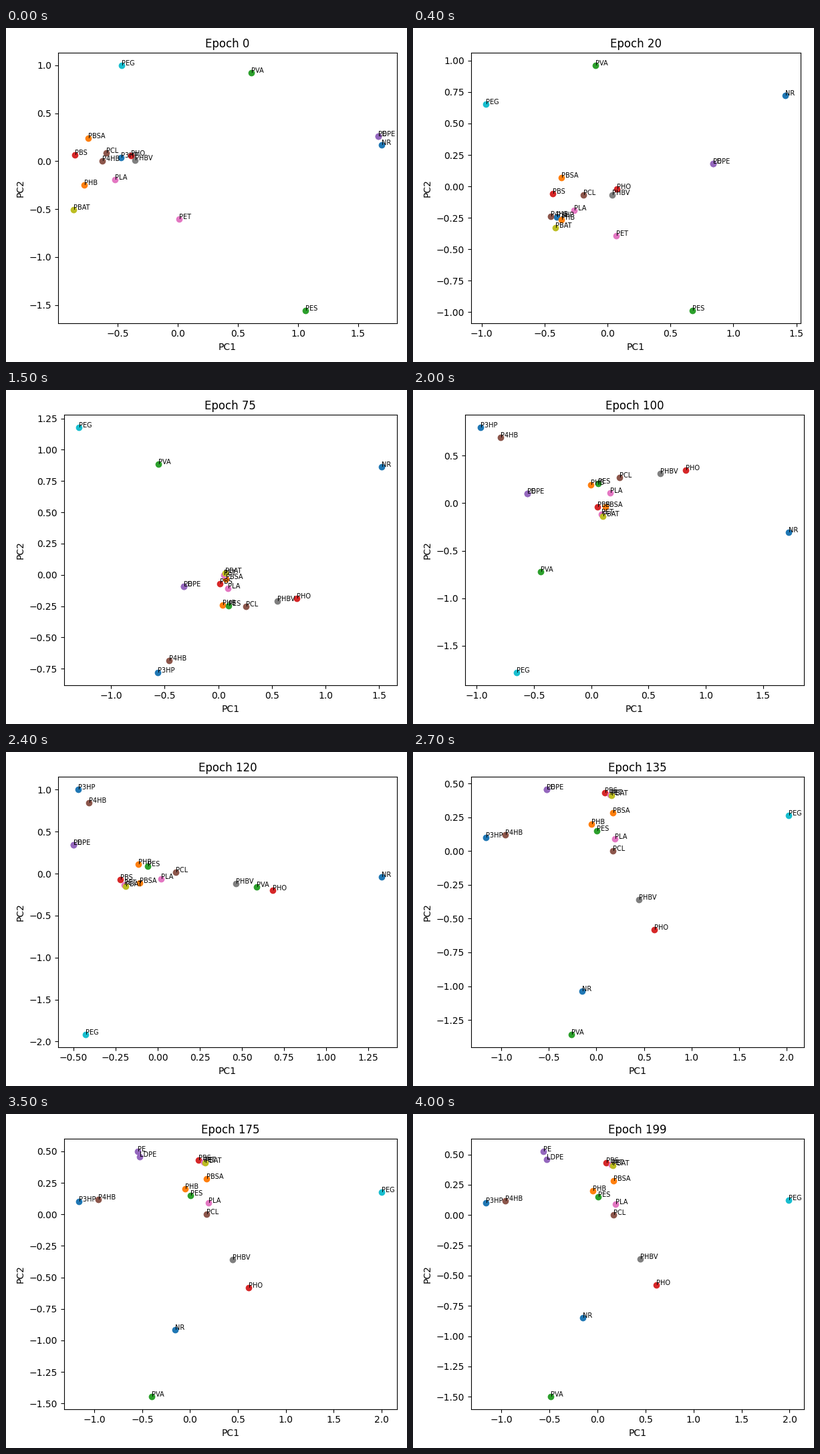
These frames come from a looping animation (600x500 px, 4.1 s). A matplotlib script:

```python
import matplotlib.pyplot as plt
import numpy as np
from matplotlib.animation import FuncAnimation

FRAMES, INTERVAL = 41, 100
LAST_EPOCH = 199

NAMES = ("NR PBSA PVA PBS PE PCL PET PHBV PBAT PEG "
         "P3HP PHB PES PHO LDPE P4HB PLA").split()

# Points are complex numbers: PC1 + PC2 * 1j.
KEYS = [0, 45, 100, 135]
LEADERS = {
    "NR": [1.695 + .17j, 1.06 + 1.409j, 1.722 - .303j, -.154 - 1.036j],
    "PVA": [.61 + .92j, -.977 + 1.018j, -.442 - .718j, -.266 - 1.36j],
    "PBS": [-.86 + .065j, .1 - .206j, .054 - .042j, .09 + .432j],
    "PE": [1.67 + .26j, -.204 + .084j, -.559 + .099j, -.526 + .457j],
    "PCL": [-.598 + .083j, .322 - .255j, .246 + .268j, .17],
    "PBAT": [-.87 - .506j, .152 - .105j, .1 - .134j, .157 + .41j],
    "PEG": [-.47 + 1j, -1.587 + .22j, -.652 - 1.785j, 2.022 + .261j],
    "P3HP": [-.477 + .035j, -.31 - .597j, -.967 + .8j, -1.16 + .1j],
    "PHB": [-.78 - .248j, .152 - .283j, -.005 + .19j, -.05 + .2j],
    "PHO": [-.393 + .06j, .661 - .121j, .824 + .345j, .61 - .58j],
    "PLA": [-.524 - .192j, .055 - .195j, .165 + .106j, .19 + .09j],
}
# Related polymers start alone, then sit between two leaders.
FOLLOWERS = {
    "PBSA": (-.747 + .24j, "PBAT", "PLA", .6),
    "PET": (.01 - .607j, "PBAT", "PBS", .8),
    "PHBV": (-.357 + .01j, "PHO", "PCL", .62),
    "PES": (1.06 - 1.56j, "PHB", "PCL", .75),
    "P4HB": (-.63, "P3HP", "PHB", .82),
    "LDPE": (1.67 + .26j, "PE", "PE", 1),
}
# Outliers still move once the rest has settled.
DRIFT = {"NR": .19j, "PVA": -.22 - .14j, "PEG": -.03 - .14j, "PE": -.04 + .07j}


def path(name):
    if name in LEADERS:
        return np.array(LEADERS[name])
    start, a, b, weight = FOLLOWERS[name]
    mix = weight * path(a) + (1 - weight) * path(b)
    return np.array([start, *mix[1:]])


POSES = np.array([path(name) for name in NAMES]).T
DRIFTS = np.array([DRIFT.get(name, 0) for name in NAMES])


def keep(z):
    return z


def swap_axes(z):
    return -1j * np.conj(z)


# Per stretch: rotation in radians, then the epoch where the axes
# change sign or order at once.
STAGES = [(0, 0, keep), (np.radians(-50), 90, np.conj), (0, 125, swap_axes)]


def positions(epoch):
    if epoch >= KEYS[-1]:
        t = (epoch - KEYS[-1]) / (LAST_EPOCH - KEYS[-1])
        return POSES[-1] + t * DRIFTS
    i = np.searchsorted(KEYS, epoch, side="right") - 1
    spin, switch, turn = STAGES[i]
    t = (epoch - KEYS[i]) / (KEYS[i + 1] - KEYS[i])
    end = turn(POSES[i + 1]) * np.exp(-1j * spin)
    z = ((1 - t) * POSES[i] + t * end) * np.exp(1j * spin * t)
    return turn(z) if epoch >= switch else z


fig, ax = plt.subplots(figsize=(6, 5), dpi=100)


def draw(frame):
    epoch = min(frame * 5, LAST_EPOCH)
    ax.clear()
    fig.subplots_adjust(left=.125, right=.9, bottom=.11, top=.88)
    for i, (name, z) in enumerate(zip(NAMES, positions(epoch))):
        ax.scatter(z.real, z.imag, color=f"C{i % 10}")
        ax.text(z.real, z.imag, name, fontsize=7)
    ax.set_title(f"Epoch {epoch}")
    ax.set_xlabel("PC1")
    ax.set_ylabel("PC2")
    fig.tight_layout()
    return ax.get_children()


anim = FuncAnimation(fig, draw, frames=FRAMES, interval=INTERVAL,
                     repeat=True, repeat_delay=0)
plt.show()
```
